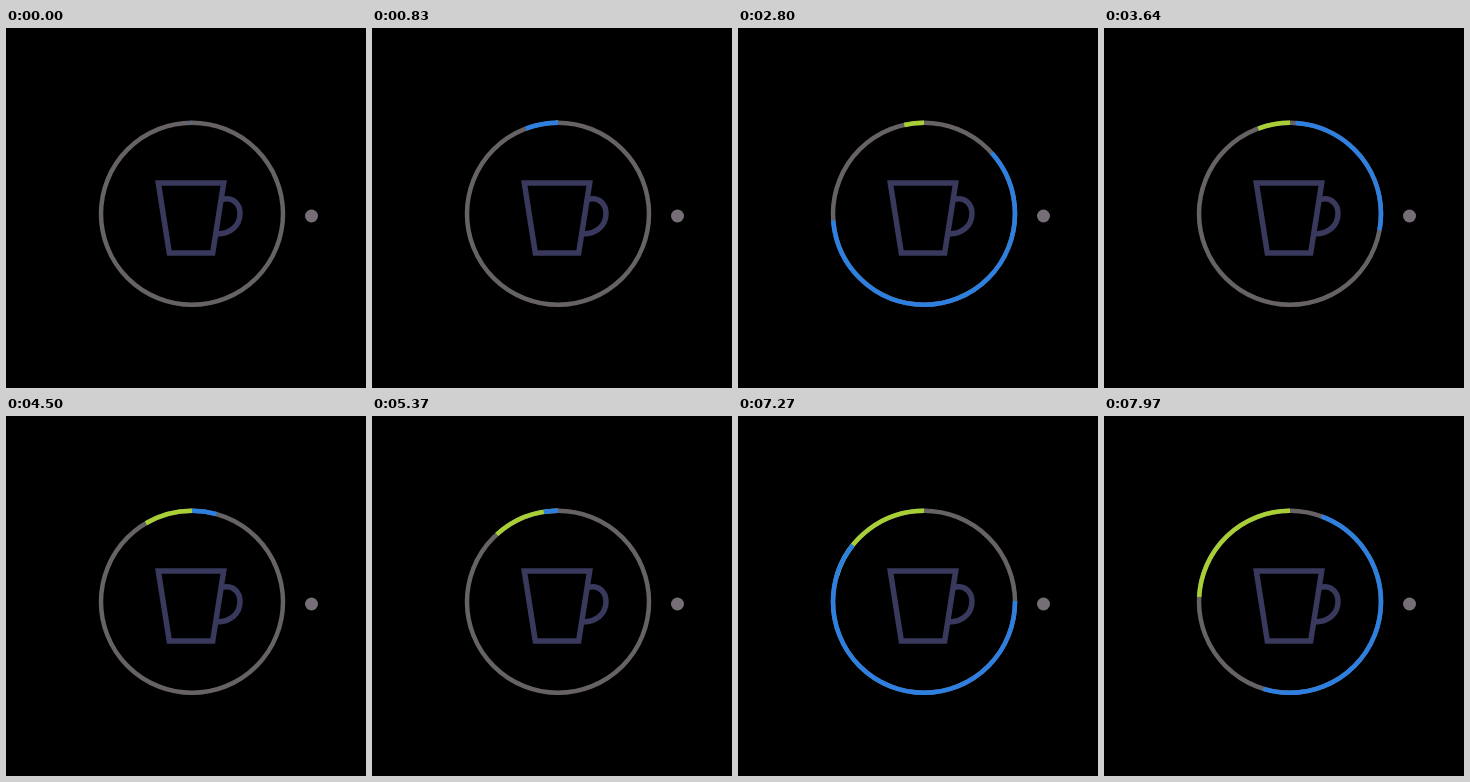
Animation, 360 px wide and 360 px high, one loop 8 s. Source, as an HTML page:

```html
<!DOCTYPE html>
<html lang="en">
<head>
<meta charset="utf-8">
<title>Coffee timer</title>
<style>
  html, body { margin: 0; width: 100%; height: 100%; overflow: hidden; background: #000; }
  svg { display: block; width: 100vw; height: 100vh; }
  .line { fill: none; stroke-width: 4.5; }
  .track { stroke: #666265; }
  .progress { stroke: #a8d036; }
  .sweep { stroke: #2d7fe0; }
  .cup { fill: none; stroke: #38395c; stroke-width: 5.5; }
  .dot { fill: #766e76; }
</style>
</head>
<body>
<svg viewBox="0 0 360 360">
  <circle class="line track" cx="186" cy="185.8" r="91"/>
  <g id="arcs"></g>
  <g class="cup">
    <path d="M152.3 155H217.7L206.7 225H163.3Z"/>
    <path d="M216 171.5C227 168.5 234 176 234 185.5C234 198 224 206 211 206"/>
  </g>
  <circle class="dot" cx="305.5" cy="188" r="6.5"/>
</svg>
<script>
  const LOOP = 8000;
  const SWEEP_STARTS = [-270, 4535];
  const SWEEP_TIME = 4530;
  const TAIL_LAG = 1245;
  // Counter-clockwise circle starting at the top
  const RING = 'M186 94.8A91 91 0 0 0 186 276.8A91 91 0 0 0 186 94.8';

  const arcs = document.getElementById('arcs');

  function addArc(className) {
    const path = document.createElementNS('http://www.w3.org/2000/svg', 'path');
    path.setAttribute('d', RING);
    path.setAttribute('pathLength', 360);
    path.setAttribute('class', 'line ' + className);
    arcs.append(path);
    return path;
  }

  function setArc(path, from, to) {
    const length = to - from;
    path.style.visibility = length > 0.05 ? 'visible' : 'hidden';
    path.setAttribute('stroke-dasharray', `0 ${from} ${length} 400`);
  }

  function easeInOutCubic(x) {
    const p = Math.min(1, Math.max(0, x));
    return p < 0.5 ? 4 * p ** 3 : 1 - 4 * (1 - p) ** 3;
  }

  const sweepAngle = elapsed => 360 * easeInOutCubic(elapsed / SWEEP_TIME);

  function progressAngle(t) {
    const phase = (1.3 + 7.22 * t / 1000) * Math.PI / 180;
    return 180 * (1 - Math.cos(phase));
  }

  const progress = addArc('progress');
  const sweeps = SWEEP_STARTS.map(() => addArc('sweep'));

  function draw(t) {
    setArc(progress, 0, progressAngle(t));
    sweeps.forEach((path, i) => {
      const elapsed = t - SWEEP_STARTS[i];
      setArc(path, sweepAngle(elapsed - TAIL_LAG), sweepAngle(elapsed));
    });
  }

  const start = performance.now();
  function tick() {
    draw((performance.now() - start) % LOOP);
    requestAnimationFrame(tick);
  }
  tick();
</script>
</body>
</html>
```
